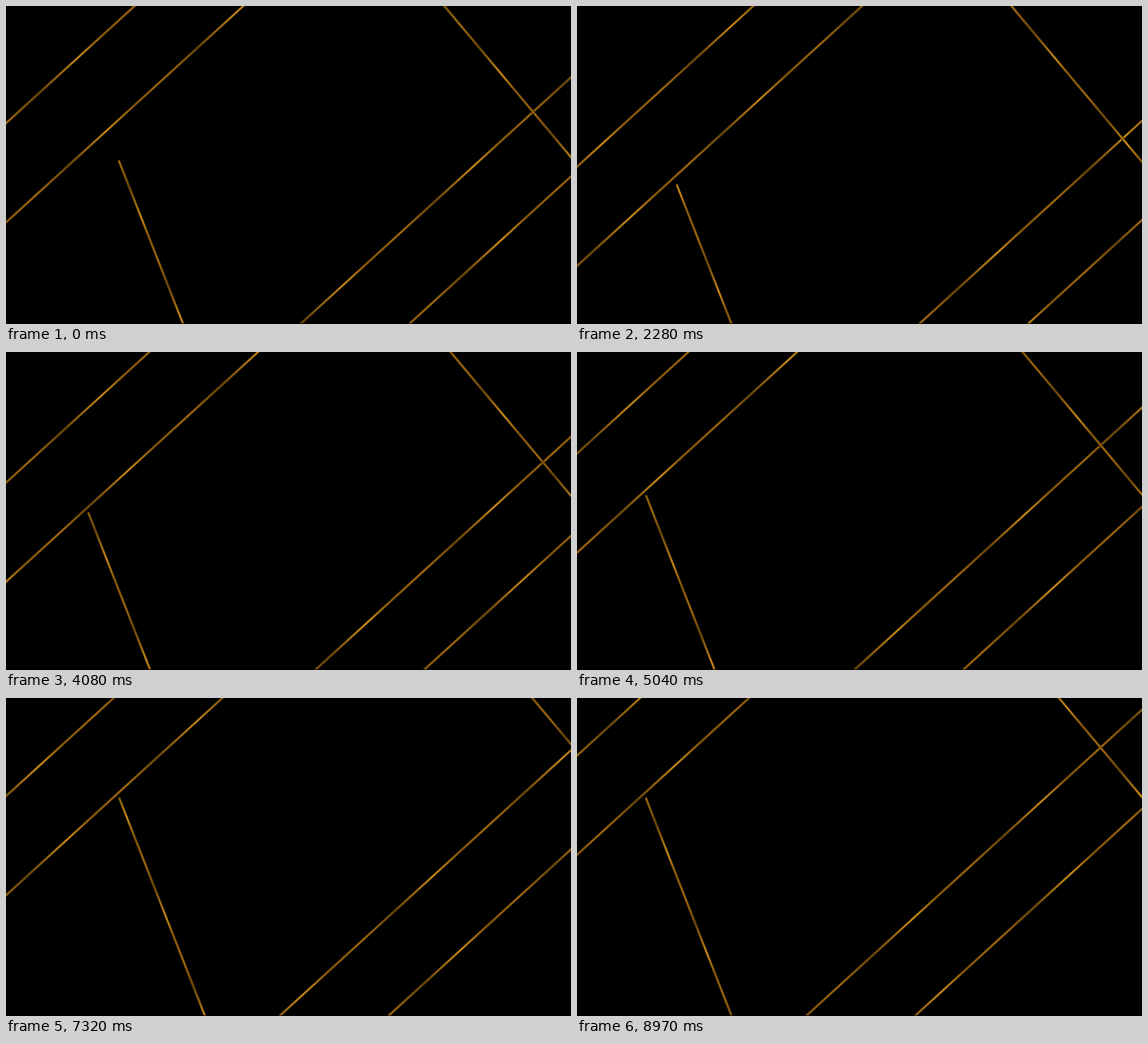
These frames come from a looping animation (852 by 480 pixels, 9000 ms). An HTML page without scripts:

```html
<!DOCTYPE html>
<html lang="en">
<head>
<meta charset="utf-8">
<title>Golden lines</title>
<style>
  html, body { margin: 0; width: 100%; height: 100%; overflow: hidden; background: #000; }
  svg { display: block; width: 100vw; height: 100vh; }
  .edge { stroke: #402a05; stroke-width: 4.2; }
  .core { stroke-width: 2.3; }
  .rise { stroke: url(#rise); }
  .fall { stroke: url(#fall); }

  .sway, .lift, .slide { animation: sway 9s infinite; }
  .lift { animation-name: lift; }
  .slide { animation-name: slide; }

  /* sideways drift of everything */
  @keyframes sway {
    0% { translate: 0 0; animation-timing-function: cubic-bezier(.33, .35, .67, .95); }
    35.3% { translate: 33px 0; animation-timing-function: ease-in-out; }
    56% { translate: -5px 0; animation-timing-function: ease-in-out; }
    75.5% { translate: 68px 0; animation-timing-function: ease-in; }
    100% { translate: -7px 0; }
  }
  /* vertical drift of everything */
  @keyframes lift {
    0% { translate: 0 0; animation-timing-function: ease-out; }
    15% { translate: 0 46.6px; animation-timing-function: ease-in; }
    56% { translate: 0 -19px; animation-timing-function: ease-out; }
    82%, 100% { translate: 0 -85px; }
  }
  /* the short line slides left on its own */
  @keyframes slide {
    0% { translate: 0 0; animation-timing-function: ease-in; }
    15% { translate: -17px -18.6px; animation-timing-function: ease-out; }
    35.3%, 100% { translate: -61px 2.4px; }
  }
</style>
</head>
<body>
<svg viewBox="0 0 852 480">
  <defs>
    <linearGradient id="sheen" gradientUnits="userSpaceOnUse" spreadMethod="repeat">
      <stop offset="0" stop-color="#6a460b"/>
      <stop offset=".3" stop-color="#d08f18"/>
      <stop offset=".5" stop-color="#875808"/>
      <stop offset=".75" stop-color="#a56c0d"/>
      <stop offset="1" stop-color="#6a460b"/>
    </linearGradient>
    <linearGradient id="rise" href="#sheen" x1="0" y1="0" x2="230" y2="-90">
      <animateTransform attributeName="gradientTransform" type="translate"
        from="0 0" to="-460 180" dur="9s" repeatCount="indefinite"/>
    </linearGradient>
    <linearGradient id="fall" href="#sheen" x1="0" y1="0" x2="60" y2="150">
      <animateTransform attributeName="gradientTransform" type="translate"
        from="0 0" to="120 300" dur="9s" repeatCount="indefinite"/>
    </linearGradient>
    <path id="bars" d="M494-274l-1100 1004m1264-1004l-1100 1004m1712-1004l-1100 1004m1264-1004l-1100 1004"/>
    <path id="cross" d="M461-239l800 956"/>
    <path id="stub" d="M170 233l182 463"/>
  </defs>

  <g class="sway">
    <g class="lift">
      <use href="#bars" class="edge"/>
      <use href="#bars" class="core rise"/>
      <use href="#cross" class="edge"/>
      <use href="#cross" class="core fall"/>
      <g class="slide">
        <use href="#stub" class="edge"/>
        <use href="#stub" class="core fall"/>
      </g>
    </g>
  </g>
  <rect y="479" width="852" height="1" fill="#060000"/>
</svg>
</body>
</html>
```
